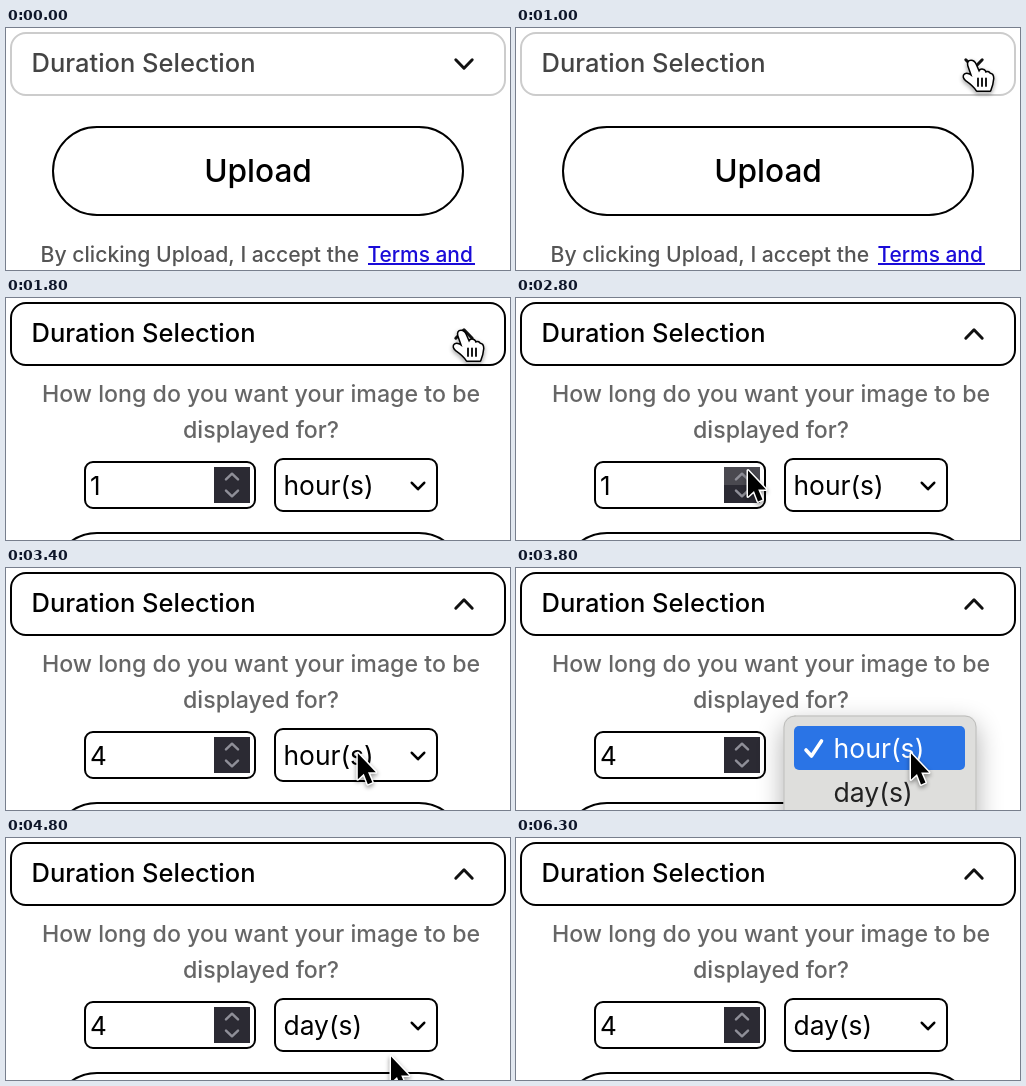
Recreate the animation shown at these times as an HTML page with a canvas. Size 504 by 242 pixels, loop 6700 ms.

```html
<!DOCTYPE html>
<html lang="en">
<head>
<meta charset="utf-8">
<title>Duration Selection</title>
<style>
html, body { margin: 0; width: 100%; height: 100%; overflow: hidden; background: #fff; }
canvas { display: block; width: 504px; height: 242px; }
</style>
</head>
<body>
<canvas id="stage" width="504" height="242"></canvas>
<script>
const LOOP = 6700, STEP = 100, PANEL = 136;
const ctx = document.getElementById('stage').getContext('2d');
const HAND = new Path2D('M451.5 37 Q450.5 32.5 454 32.5 Q457 32.5 458.5 36 L462 44 Q463 40.5 466 41.5 Q468 42 468.5 44.5 Q471 42.5 473 45.5 Q476 45.5 476 50 L475 56 L473 62 L460 62 Q457 57 449 51.5 Q445.5 48 448 46 Q451 44.5 455.5 48.5 Z');
const ARROW = new Path2D('M2 1.5 V27.5 L8 22 L12 32.5 L16.5 30.5 L12.2 20.5 H20 Z');

// Cursor legs: start, end, from, to
const LEGS = [
  [400, 1000, [497, 212], [454, 32]],
  [2100, 2800, [454, 32], [230, 171]],
  [3100, 3500, [230, 171], [372, 186]],
  [3500, 3800, [372, 186], [393, 184]],
  [4000, 4700, [393, 184], [383, 217]],
  [5500, 5700, [383, 217], [378, 243]]
];

function ease(t, a, b) {
  const p = Math.min(1, Math.max(0, (t - a) / (b - a)));
  return p * p * (3 - 2 * p);
}

function cursorAt(t) {
  let pos = LEGS[0][2];
  for (const [a, b, from, to] of LEGS) {
    if (t < a) break;
    const p = ease(t, a, b);
    pos = from.map((v, i) => v + (to[i] - v) * p);
  }
  return pos;
}

function text(str, x, y, size, color, weight = 400, align = 'left') {
  ctx.font = `${weight} ${size}px Inter, sans-serif`;
  ctx.fillStyle = color;
  ctx.textAlign = align;
  ctx.fillText(str, x, y);
}

function box(x, y, w, h, r, stroke, fill) {
  ctx.beginPath();
  ctx.roundRect(x, y, w, h, r);
  if (fill) { ctx.fillStyle = fill; ctx.fill(); }
  if (stroke) { ctx.strokeStyle = stroke; ctx.lineWidth = 2; ctx.stroke(); }
}

function line(points, color, width) {
  ctx.beginPath();
  points.forEach(([x, y]) => ctx.lineTo(x, y));
  ctx.strokeStyle = color;
  ctx.lineWidth = width;
  ctx.lineCap = ctx.lineJoin = 'round';
  ctx.stroke();
}

// A negative height points the chevron up.
function chevron(x, y, w, h, color, width) {
  line([[x - w, y - h], [x, y + h], [x + w, y - h]], color, width);
}

function header(open) {
  const active = open > 0;
  box(5, 5, 494, 62, 15, active ? '#000' : '#ccc');
  text('Duration Selection', 25.5, 44, 25.5, active ? '#000' : '#444', 500);
  ctx.save();
  ctx.translate(458, 36);
  ctx.rotate(Math.PI * open);
  chevron(0, 0, 8.2, 4.2, '#111', 3);
  ctx.restore();
}

function footer(dy) {
  ctx.save();
  ctx.translate(0, dy);
  box(47, 99, 410, 88, 44, '#000');
  text('Upload', 252, 154, 31.6, '#000', 500, 'center');
  text('By clicking Upload, I accept the', 34.5, 234, 21.2, '#555', 500);
  text('Terms and', 361.5, 234, 20.9, '#1a0bd8', 500);
  ctx.fillRect(362, 235, 107, 2);
  ctx.restore();
}

function panel(open, value, unit, hover) {
  if (!open) return;
  ctx.save();
  ctx.beginPath();
  ctx.rect(0, 69, 504, 10 + PANEL * open);
  ctx.clip();
  text('How long do you want your image to be', 255, 104, 23.2, '#666', 500, 'center');
  text('displayed for?', 255, 140, 23.2, '#666', 500, 'center');
  box(79, 164, 170, 46, 8, '#000');
  text(value, 84, 197, 26, '#000');
  ctx.fillStyle = '#2b2a33';
  ctx.fillRect(208, 169, 36, 36);
  if (hover) {
    ctx.fillStyle = '#4a4950';
    ctx.fillRect(208, 169, 36, 18);
  }
  chevron(226, 178.5, 6, -2.8, '#8f8f98', 2.5);
  chevron(226, 195.5, 6, 2.8, '#8f8f98', 2.5);
  box(269, 161, 162, 52, 8, '#000');
  text(unit, 277.5, 197, 26.4, '#000');
  chevron(412, 188, 6.2, 3.2, '#000', 2.6);
  ctx.restore();
}

function menu(day) {
  ctx.save();
  ctx.shadowColor = 'rgba(0,0,0,.32)';
  ctx.shadowBlur = 26;
  ctx.shadowOffsetY = 9;
  box(267.5, 147.5, 193, 120, 11, null, '#dededc');
  ctx.restore();
  box(268, 148, 192, 120, 11, null, '#dededc');
  ctx.strokeStyle = '#bdbdbb';
  ctx.lineWidth = 1;
  ctx.stroke();
  box(278, day ? 202 : 158, 171, 44, 5, null, '#2a74e6');
  const first = day ? '#222' : '#fff';
  line([[290, 182], [295.5, 188], [305.5, 173]], first, 3.6);
  text('hour(s)', 317.5, 190, 26.6, first);
  text('day(s)', 317.5, 234, 26.6, day ? '#fff' : '#222');
}

function cursor(t, [x, y]) {
  if (t < 500 || t >= 5700) return;
  const hand = y < 67;
  const shape = hand ? HAND : ARROW;
  ctx.save();
  ctx.translate(hand ? x - 453 : x, hand ? y - 31.5 : y);
  ctx.lineJoin = 'round';
  ctx.shadowColor = 'rgba(0,0,0,.45)';
  ctx.shadowBlur = 4;
  ctx.shadowOffsetY = 2;
  ctx.strokeStyle = hand ? '#000' : '#fff';
  ctx.lineWidth = 3;
  ctx.stroke(shape);
  ctx.shadowColor = 'transparent';
  ctx.fillStyle = hand ? '#fff' : '#000';
  ctx.fill(shape);
  if (hand) {
    for (const fx of [461, 465, 469]) line([[fx, 50], [fx, 57.5]], '#000', 1.8);
  }
  ctx.restore();
}

function draw(t) {
  const open = ease(t, 1400, 1800);
  const pos = cursorAt(t);
  const value = 1 + [2900, 3000, 3100].filter(at => t >= at).length;
  const hover = t > 2600 && pos[0] >= 208 && pos[0] < 244 && pos[1] > 168 && pos[1] < 187;
  ctx.fillStyle = '#fff';
  ctx.fillRect(0, 0, 504, 242);
  header(open);
  footer(PANEL * open);
  panel(open, String(value), t < 4800 ? 'hour(s)' : 'day(s)', hover);
  if (t >= 3600 && t < 4800) menu(pos[1] > 202);
  cursor(t, pos);
}

function tick(now) {
  draw(Math.floor((now % LOOP) / STEP) * STEP);
  requestAnimationFrame(tick);
}
draw(0);
requestAnimationFrame(tick);
</script>
</body>
</html>
```
